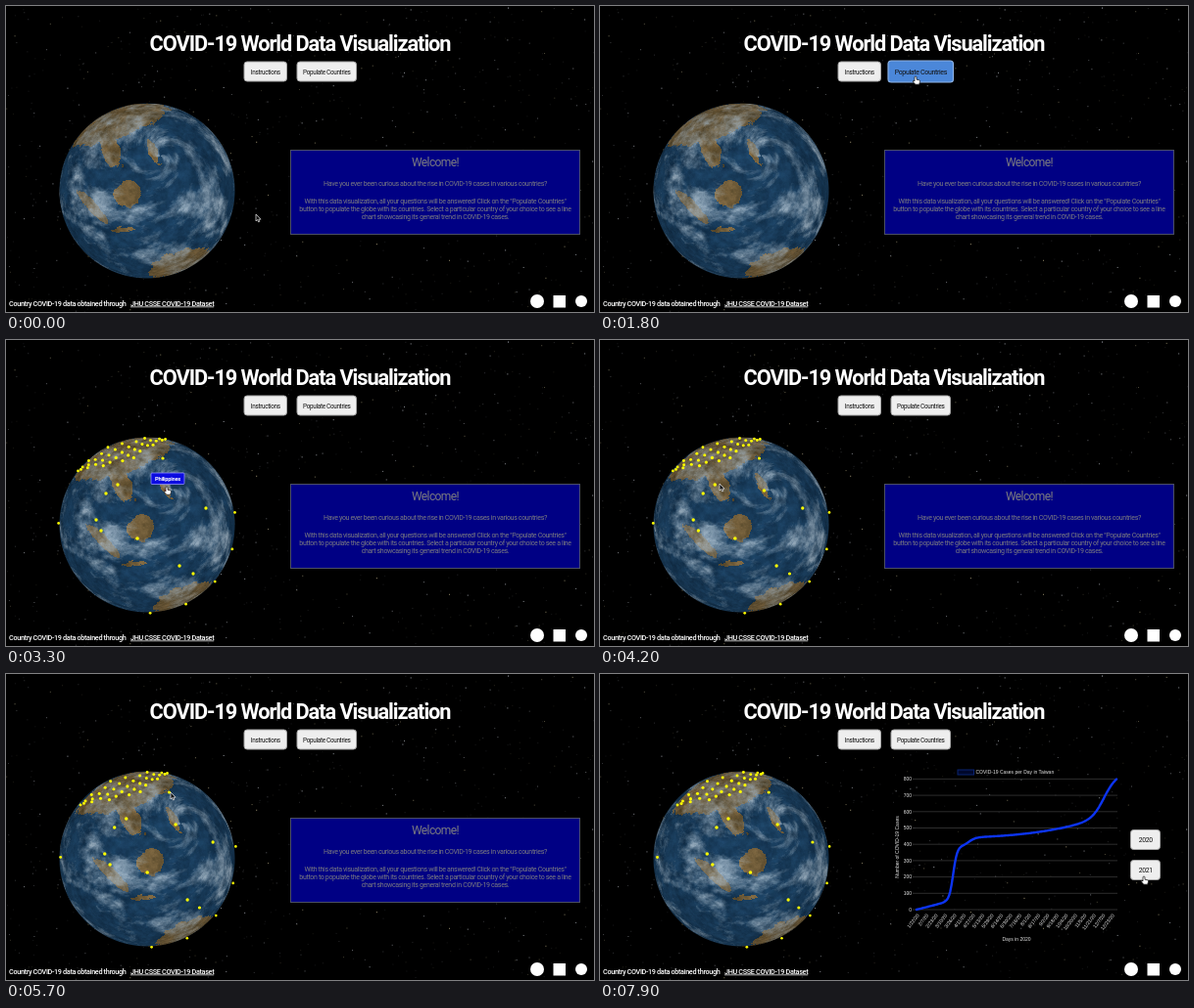
Recreate the animation shown at these times as an HTML page with a canvas. Size 600 px wide and 313 px high, loop 8 s.

```html
<!DOCTYPE html>
<html lang="en">
<head>
<meta charset="utf-8">
<title>COVID-19 World Data Visualization</title>
<style>
  html, body { margin: 0; width: 100%; height: 100%; overflow: hidden; background: #000; }
  canvas, svg { position: absolute; left: 0; top: 0; width: 600px; height: 313px; }
  text { font-family: Roboto, sans-serif; letter-spacing: -.05em; fill: #fff; }
  .mid { text-anchor: middle; }
  .button rect { fill: #eee; stroke: #a5a5a5; }
  .button text { fill: #111; text-anchor: middle; }
  .button.hover rect { fill: #4b87d9; stroke: #8fb4e6; }
  #panel text { fill: #7b7b80; font-size: 7.05px; text-anchor: middle; }
  #chart > text, #axes text { font: 5px "Liberation Sans", Arial, sans-serif; letter-spacing: 0; fill: #e8e8e8; }
  #axes line { stroke: #4c4c4c; stroke-width: .6; }
</style>
</head>
<body>
<canvas id="sky" width="600" height="313"></canvas>
<canvas id="globe" width="600" height="313"></canvas>
<svg viewBox="0 0 600 313">
  <text class="mid" x="300" y="45.5" font-size="21.8" font-weight="700">COVID-19 World Data Visualization</text>
  <g class="button">
    <rect x="243" y="57" width="43.5" height="20" rx="3"/>
    <text x="264.8" y="69.7" font-size="6.4">Instructions</text>
  </g>
  <g class="button" id="populate">
    <rect x="297" y="57" width="60.5" height="20" rx="3"/>
    <text x="327.3" y="69.7" font-size="6.4">Populate Countries</text>
  </g>

  <g id="panel">
    <rect x="290.5" y="147.5" width="295" height="86" fill="#000084" stroke="#4b4f66"/>
    <text x="438" y="164" style="font-size:12px">Welcome!</text>
    <text x="438" y="184">Have you ever been curious about the rise in COVID-19 cases in various countries?</text>
    <text x="438" y="201.5">With this data visualization, all your questions will be answered! Click on the "Populate Countries"</text>
    <text x="438" y="209.7">button to populate the globe with its countries. Select a particular country of your choice to see a line</text>
    <text x="438" y="217.9">chart showcasing its general trend in COVID-19 cases.</text>
  </g>

  <g id="chart">
    <rect x="365" y="98" width="16.5" height="5" fill="#00082c" stroke="#0a2470"/>
    <text x="383.5" y="102.4">COVID-19 Cases per Day in Taiwan</text>
    <g id="axes"></g>
    <text class="mid" transform="translate(305.3 177) rotate(-90)">Number of COVID-19 Cases</text>
    <text class="mid" x="425" y="272.5">Days in 2020</text>
    <polyline id="series" fill="none" stroke="#0c34f4" stroke-width="2.4" stroke-linejoin="round" stroke-linecap="round"/>
    <g class="button"><rect x="541.5" y="159.5" width="30" height="20" rx="3"/><text x="556.7" y="172.4" font-size="6.8">2020</text></g>
    <g class="button"><rect x="541.5" y="190.5" width="30" height="20" rx="3"/><text x="556.7" y="203.4" font-size="6.8">2021</text></g>
  </g>

  <g font-size="7.3" font-weight="500">
    <text x="3" y="306.5">Country COVID-19 data obtained through</text>
    <text x="127" y="306.5" text-decoration="underline">JHU CSSE COVID-19 Dataset</text>
  </g>
  <g fill="#fff">
    <circle cx="542" cy="302" r="7"/>
    <rect x="558.5" y="296" width="12.5" height="12.5"/>
    <circle cx="587" cy="302" r="6"/>
  </g>

  <g id="tooltip">
    <rect y="-6" height="11.5" rx="1" fill="#0b0be0" stroke="#8d8dff" stroke-width=".8"/>
    <text class="mid" y="2" font-size="5.8" font-weight="700"></text>
  </g>
  <g id="cursor" stroke-linejoin="round">
    <path id="arrow" d="M0 0V7L1.6 5.6 2.7 8 3.8 7.5 2.8 5.2H5Z" fill="#111" stroke="#eee" stroke-width=".7"/>
    <path id="hand" d="M-1 1Q-1 0 0 0T1 1V3.2L3.6 3.8Q4.8 4.2 4.5 5.4L3.7 8.2H-.2L-3 5Q-2.6 3.8-1 5Z" fill="#fff" stroke="#111" stroke-width=".7"/>
  </g>
</svg>
<script>
const LOOP = 8000, STEP = 100;
const R = 89.5, CX = 144, CY = 189, SPIN = 0.047;   // spin in radians per second
const $ = id => document.getElementById(id);
const clamp = (v, lo = 0, hi = 1) => Math.min(hi, Math.max(lo, v));
const mix = (a, b, k) => a + (b - a) * k;
const smooth = k => k * k * (3 - 2 * k);
const sigmoid = v => 1 / (1 + Math.exp(-v));
const show = (el, on) => el.style.display = on ? '' : 'none';

// --- Sky ---
let seed = 19;
const random = () => (seed = (seed * 1664525 + 1013904223) >>> 0) / 2 ** 32;
const sky = $('sky').getContext('2d');
sky.fillRect(0, 0, 600, 313);
for (let i = 0; i < 900; i++) {
  const light = random() ** 4 * 0.6 + 0.1;
  sky.fillStyle = `rgba(${random() < 0.3 ? '235,220,170' : '215,220,230'},${light})`;
  sky.fillRect(random() * 600, random() * 313, 1, 1);
}

// --- Noise on the sphere ---
function hash(x, y, z) {
  let h = Math.imul(x, 374761393) ^ Math.imul(y, 668265263) ^ Math.imul(z, 1440662683);
  h = Math.imul(h ^ (h >>> 13), 1274126177);
  return ((h ^ (h >>> 16)) >>> 0) / 2 ** 32;
}
function noise(x, y, z) {
  const i = Math.floor(x), j = Math.floor(y), k = Math.floor(z);
  const u = smooth(x - i), v = smooth(y - j), w = smooth(z - k);
  const edge = (b, c) => mix(hash(i, b, c), hash(i + 1, b, c), u);
  const face = c => mix(edge(j, c), edge(j + 1, c), v);
  return mix(face(k), face(k + 1), w);
}
function fbm(x, y, z, octaves) {
  let sum = 0, total = 0;
  for (let n = 0, amp = 1, f = 1; n < octaves; n++, amp *= 0.6, f *= 2.1) {
    sum += amp * noise(x * f + 9 * n, y * f, z * f);
    total += amp;
  }
  return sum / total;
}

// --- Globe surface: columns follow longitude, rows follow height ---
const SIZE = 180, COLS = 690, PER_RAD = 2 * R, LEFT = 2.05;
const longitude = (x, y, r = R) =>
  Math.asin(clamp((x - CX) / Math.sqrt(Math.max(1, r * r - (y - CY) ** 2)), -1, 1));

// Land is a handful of tilted ellipses; noise makes their coasts ragged.
const land = [
  { name: 'Asia', x: 112, y: 118, rx: 56, ry: 18, tilt: -0.35 },
  { name: 'Indochina', x: 107, y: 147, rx: 9, ry: 20, tilt: -0.25 },
  { name: 'Sumatra', x: 88, y: 205, rx: 22, ry: 5, tilt: 0.85 },
  { name: 'Java', x: 119, y: 229, rx: 15, ry: 2.5, tilt: 0.1 },
  { name: 'Borneo', x: 124, y: 192, rx: 12, ry: 14, tilt: 0.3 },
  { name: 'Philippines', x: 151, y: 150, rx: 4, ry: 14, tilt: -0.4 },
  { name: 'Australia', x: 178, y: 264, rx: 34, ry: 13, tilt: -0.3 }
];

function landMask() {
  const map = Object.assign(document.createElement('canvas'), { width: COLS, height: SIZE }).getContext('2d');
  for (const { x, y, rx, ry, tilt } of land) {
    map.beginPath();
    for (let a = 0; a < 2 * Math.PI; a += 0.2) {
      const u = rx * Math.cos(a), v = ry * Math.sin(a);
      const px = x + u * Math.cos(tilt) - v * Math.sin(tilt);
      const py = y + u * Math.sin(tilt) + v * Math.cos(tilt);
      map.lineTo((longitude(px, py) + LEFT) * PER_RAD, py - CY + 90);
    }
    map.fill();
  }
  return map.getImageData(0, 0, COLS, SIZE).data;
}

function buildSurface() {
  const mask = landMask();
  const surface = new Uint8ClampedArray(COLS * SIZE * 3);
  const eye = { x: 0.15, y: -0.4 };
  for (let row = 0; row < SIZE; row++) {
    const y = clamp((row + 0.5 - 90) / R, -1, 1), ring = Math.sqrt(1 - y * y);
    for (let col = 0; col < COLS; col++) {
      const lon = col / PER_RAD - LEFT;
      const x = ring * Math.sin(lon), z = ring * Math.cos(lon);
      const fine = fbm(x * 11 + 40, y * 11 + 40, z * 11 + 40, 4);
      const jitter = (fine - 0.5) * 18;
      const mc = clamp(Math.round(col + jitter * 1.5), 0, COLS - 1);
      const mr = clamp(Math.round(row + jitter * 0.6), 0, SIZE - 1);
      const isLand = mask[(mr * COLS + mc) * 4 + 3] > 128;

      // Clouds wind around the eye of a large storm.
      const dx = x - eye.x, dy = y - eye.y, d = Math.hypot(dx, dy);
      const front = z > 0 ? 1 : 0;
      const turn = front * 3.2 * Math.exp(-d / 0.25), c = Math.cos(turn), s = Math.sin(turn);
      const px = eye.x + dx * c - dy * s, py = eye.y + dx * s + dy * c;
      const arms = front * Math.cos(2 * Math.atan2(dy, dx) - d * 17) * Math.exp(-d * d / 0.12) * 0.16;
      const n = fbm(px * 3.4 + 20, py * 4.6 + 20, z * 3.4 + 20, 5) + arms;
      const cloud = clamp((n - 0.46) * 4) * (0.1 + 1.3 * fine) * (isLand ? 0.7 : 0.9);

      const base = isLand
        ? [62 + 100 * fine, 52 + 80 * fine, 28 + 58 * fine]
        : [12 + 26 * fine, 38 + 46 * fine, 62 + 62 * fine];
      [168, 188, 204].forEach((white, i) =>
        surface[(row * COLS + col) * 3 + i] = mix(base[i], white, clamp(cloud, 0, 0.9)));
    }
  }
  return surface;
}

const surface = buildSurface();
const globe = $('globe').getContext('2d');
const image = globe.createImageData(SIZE, SIZE);
const pixels = [];
for (let row = 0; row < SIZE; row++) {
  for (let col = 0; col < SIZE; col++) {
    const x = col + 0.5 - 90, y = row + 0.5 - 90, r = Math.hypot(x, y);
    const cover = clamp(R + 0.5 - r);
    if (!cover) continue;
    const depth = Math.sqrt(Math.max(0, 1 - (r / R) ** 2));
    pixels.push({ at: (row * SIZE + col) * 4, row, cover: cover * 255,
      column: (longitude(CX + x, CY + y) + LEFT) * PER_RAD, light: 0.75 + 0.25 * depth });
  }
}

// --- Country markers, placed where they stand at MARK_TIME ---
const MARK_TIME = 3.3, MARK_R = R * 1.02;
const markers = [];
function addMarker(x, y) {
  const marker = { y, lon: longitude(x, y, MARK_R) };
  markers.push(marker);
  return marker;
}
function addPolar(degrees, radius) {
  const a = degrees * Math.PI / 180;
  addMarker(CX + MARK_R * radius * Math.cos(a), CY + MARK_R * radius * Math.sin(a));
}
const named = { Philippines: addMarker(164, 154), Taiwan: addMarker(160, 121) };
const scattered = { Vietnam: [114, 148], Thailand: [102, 157], Singapore: [92, 184], Malaysia: [97, 195],
  Indonesia: [134, 203], Palau: [204, 172], Timor: [177, 231], Papua: [191, 239] };
for (const [x, y] of Object.values(scattered)) addMarker(x, y);
for (let i = 0; i < 34; i++) addPolar(-142 + 64 * i / 33, 0.98 - 0.24 * (i * 0.618 % 1) * Math.sin(Math.PI * i / 33));
for (let angle = -8; angle < 100; angle += 24) addPolar(angle, 0.99);
addPolar(181, 0.99);

function drawGlobe(t, populated, hovered) {
  const shift = SPIN * t * PER_RAD;
  for (const p of pixels) {
    const from = (p.row * COLS + Math.floor(p.column - shift)) * 3;
    for (let i = 0; i < 3; i++) image.data[p.at + i] = surface[from + i] * p.light;
    image.data[p.at + 3] = p.cover;
  }
  globe.clearRect(0, 0, 600, 313);
  globe.putImageData(image, CX - 90, CY - 90);
  if (!populated) return;
  for (const m of markers) {
    const lon = m.lon + SPIN * (t - MARK_TIME);
    const ring = Math.sqrt(Math.max(0, MARK_R ** 2 - (m.y - CY) ** 2));
    const depth = ring * Math.cos(lon) / MARK_R;
    if (depth < -0.2) continue;
    globe.fillStyle = m === named[hovered] ? '#f01818' : '#ffff00';
    globe.beginPath();
    globe.arc(CX + ring * Math.sin(lon), m.y, 1.3 + 0.5 * clamp(depth), 0, 7);
    globe.fill();
  }
}

// --- Chart ---
const DAYS = 344, chartX = day => 323 + day / DAYS * 204, chartY = v => 241 - v * 0.167;
// A slow start, a steep spring wave with a tail, then growth into winter.
const cases = day => 45 * Math.min(day / 50, 1)
  + 340 * sigmoid((day - 63) / 3.5) + 55 * sigmoid((day - 90) / 6)
  + 60 * (day / 250) ** 3 + 225 * sigmoid((day - 322) / 10);

let axes = '';
for (let v = 0; v <= 800; v += 100)
  axes += `<line x1="319" x2="528" y1="${chartY(v)}" y2="${chartY(v)}"/>
    <text x="318" y="${chartY(v) + 1.8}" text-anchor="end">${v}</text>`;
for (let day = 0; day <= DAYS; day += 16) {
  const date = new Date(Date.UTC(2020, 0, 22 + day));
  axes += `<text transform="translate(${chartX(day) + 3} 247) rotate(-52)" text-anchor="end">${
    date.getUTCMonth() + 1}/${date.getUTCDate()}/20</text>`;
}
$('axes').innerHTML = axes;

function drawSeries(grow) {
  let points = '';
  for (let day = 0; day <= DAYS; day += 2) points += `${chartX(day)},${chartY(cases(day) * grow)} `;
  $('series').setAttribute('points', points);
}

// --- Pointer ---
const moves = [
  { from: 200, to: 1200, x: 322, y: 72 },
  { from: 2100, to: 2900, x: 164, y: 150 },
  { from: 3500, to: 4200, x: 122, y: 147 },
  { from: 4700, to: 5600, x: 168, y: 121 },
  { from: 6700, to: 7300, x: 555, y: 207 }
];
function pointerAt(ms) {
  let x = 255, y = 213;
  for (const move of moves) {
    const k = smooth(clamp((ms - move.from) / (move.to - move.from)));
    x = mix(x, move.x, k);
    y = mix(y, move.y, k);
  }
  return [x, y];
}

function drawTooltip(name, x, y) {
  show($('tooltip'), name);
  const [box, label] = $('tooltip').children;
  const width = name.length * 2 + 12;
  box.setAttribute('x', -width / 2);
  box.setAttribute('width', width);
  label.textContent = name;
  $('tooltip').setAttribute('transform', `translate(${x + 1} ${y - 8})`);
}

function draw(ms) {
  const [x, y] = pointerAt(ms);
  const onPopulate = x > 296 && x < 358 && y > 57 && y < 78;
  const onYear = x > 541 && x < 572 && y > 190 && y < 211;
  const hovered = ms >= 2900 && ms < 3600 ? 'Philippines' : ms >= 5900 && ms < 6800 ? 'Taiwan' : '';
  const charted = ms >= 6400;

  drawGlobe(ms / 1000, ms >= 2100, hovered);
  $('populate').classList.toggle('hover', onPopulate);
  $('populate').setAttribute('transform',
    onPopulate ? 'translate(327.3 67.3) scale(1.1) translate(-327.3 -67.3)' : '');
  show($('panel'), !charted);
  show($('chart'), charted);
  if (charted) drawSeries(1 - (1 - clamp((ms - 6450) / 1000)) ** 4);

  drawTooltip(hovered, x, y);
  const pointing = onPopulate || onYear || hovered;
  show($('hand'), pointing);
  show($('arrow'), !pointing);
  $('cursor').setAttribute('transform', `translate(${x} ${y})`);
}

const start = performance.now();
let shown = -1;
function tick() {
  const ms = Math.floor((performance.now() - start) % LOOP / STEP) * STEP;
  if (ms !== shown) draw(shown = ms);
  requestAnimationFrame(tick);
}
tick();
</script>
</body>
</html>
```
